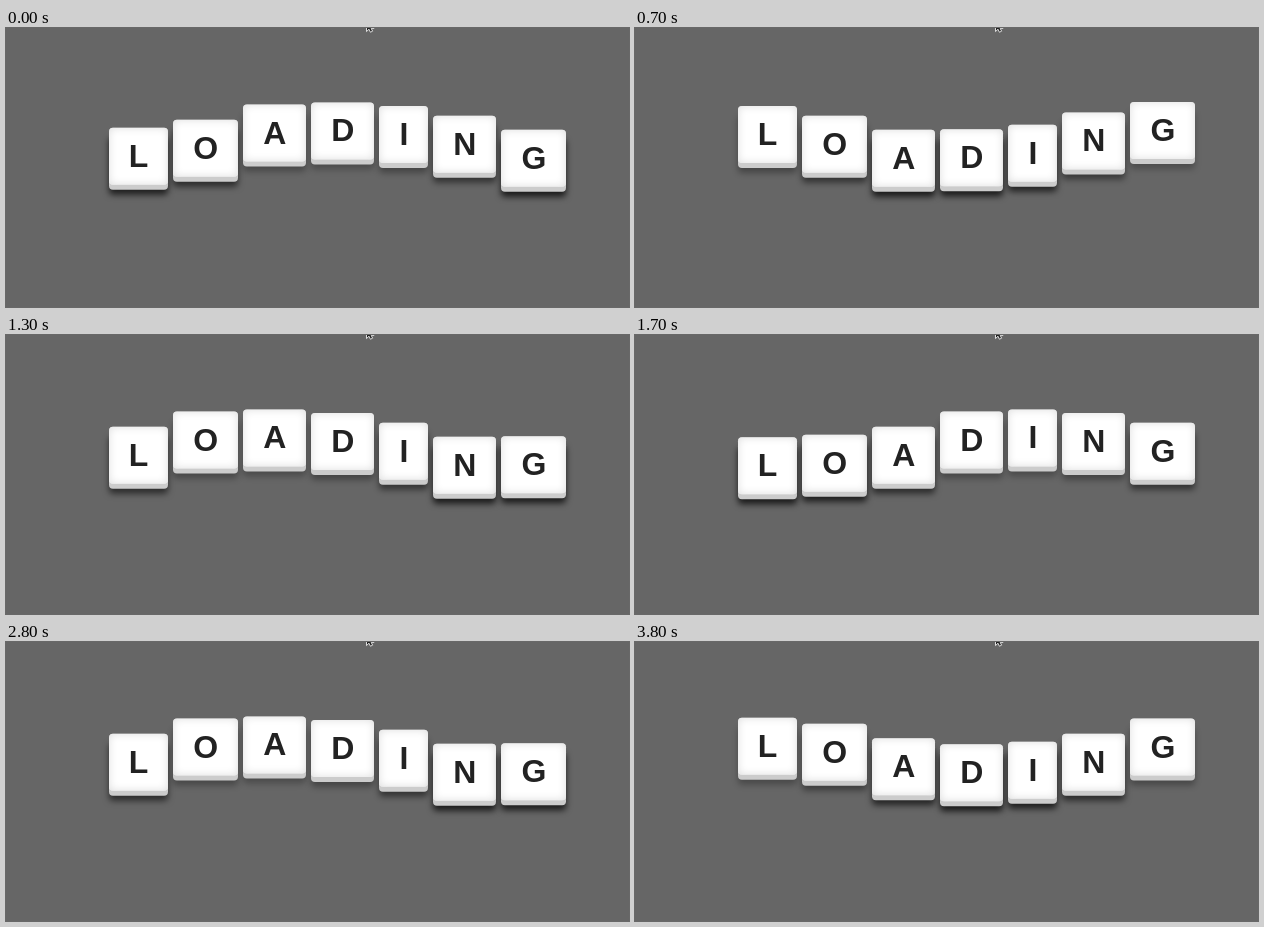
These frames come from a looping animation (623 by 279 pixels, 3.9 s). An HTML page:

```html
<!DOCTYPE html>
<html lang="en">
<head>
<meta charset="utf-8">
<title>Loading</title>
<style>
  html, body { margin: 0; width: 100%; height: 100%; overflow: hidden; background: #666; }
  #stage { position: relative; width: 623px; height: 279px; overflow: hidden; background: #666; }
  .key {
    position: absolute; top: 0; height: 57px; padding-top: 10px; box-sizing: border-box;
    border-radius: 4px; background: #fff; color: #222; text-align: center;
    font: bold 32px/37px "Liberation Sans", Arial, sans-serif;
  }
  svg { position: absolute; left: 0; top: 0; }
</style>
</head>
<body>
<div id="stage">
  <svg width="623" height="10">
    <path d="M360.5 -4V3.6L363 1.2L364.4 4.2L366.6 3.2L365.2 0.4H368V-4Z" fill="#222" stroke="#eee" stroke-width="0.9"/>
  </svg>
</div>
<script>
const LOOP = 3900, STEP = 100, PERIOD = 1500, LAG = 200;
const RISE_AT = 276, LOW = 102.3, HIGH = 74;
const SIZE = 32, PAD = 20, GAP = 5;
const advance = { L: 0.611, O: 0.778, A: 0.722, D: 0.722, I: 0.278, N: 0.722, G: 0.778 };
const stage = document.getElementById('stage');

let x = 102.8;
const keys = [...'LOADING'].map(letter => {
  const key = document.createElement('div');
  const width = advance[letter] * SIZE + 2 * PAD;
  key.className = 'key';
  key.textContent = letter;
  key.style.left = x + 'px';
  key.style.width = width + 'px';
  stage.appendChild(key);
  x += width + GAP;
  return key;
});

// cubic-bezier(.25, .1, .25, 1)
function ease(p) {
  let a = 0, b = 1, u = 0.5;
  for (let i = 0; i < 24; i++) {
    u = (a + b) / 2;
    if (0.75 * u * (1 - u) + u ** 3 < p) a = u; else b = u;
  }
  return 0.3 * u * (1 - u) ** 2 + 3 * u * u * (1 - u) + u ** 3;
}

// 0 = resting low, 1 = fully raised
function lift(t) {
  const phase = (((t - RISE_AT) % PERIOD) + PERIOD) % PERIOD / (PERIOD / 2);
  return phase < 1 ? ease(phase) : 1 - ease(phase - 1);
}

function draw(t) {
  keys.forEach((key, i) => {
    const h = lift(t - i * LAG);
    const dark = 0.75 - 0.5 * h;
    key.style.transform = `translateY(${(LOW + (HIGH - LOW) * h).toFixed(2)}px)`;
    key.style.boxShadow =
      `inset 0 0 8px #ddd, 0 5px 0 #ccc, 0 10px 6px rgba(0,0,0,${dark.toFixed(3)})`;
  });
}

const start = performance.now();
function tick() {
  const t = (performance.now() - start) % LOOP;
  draw(Math.floor(t / STEP) * STEP);
  requestAnimationFrame(tick);
}
tick();
</script>
</body>
</html>
```
